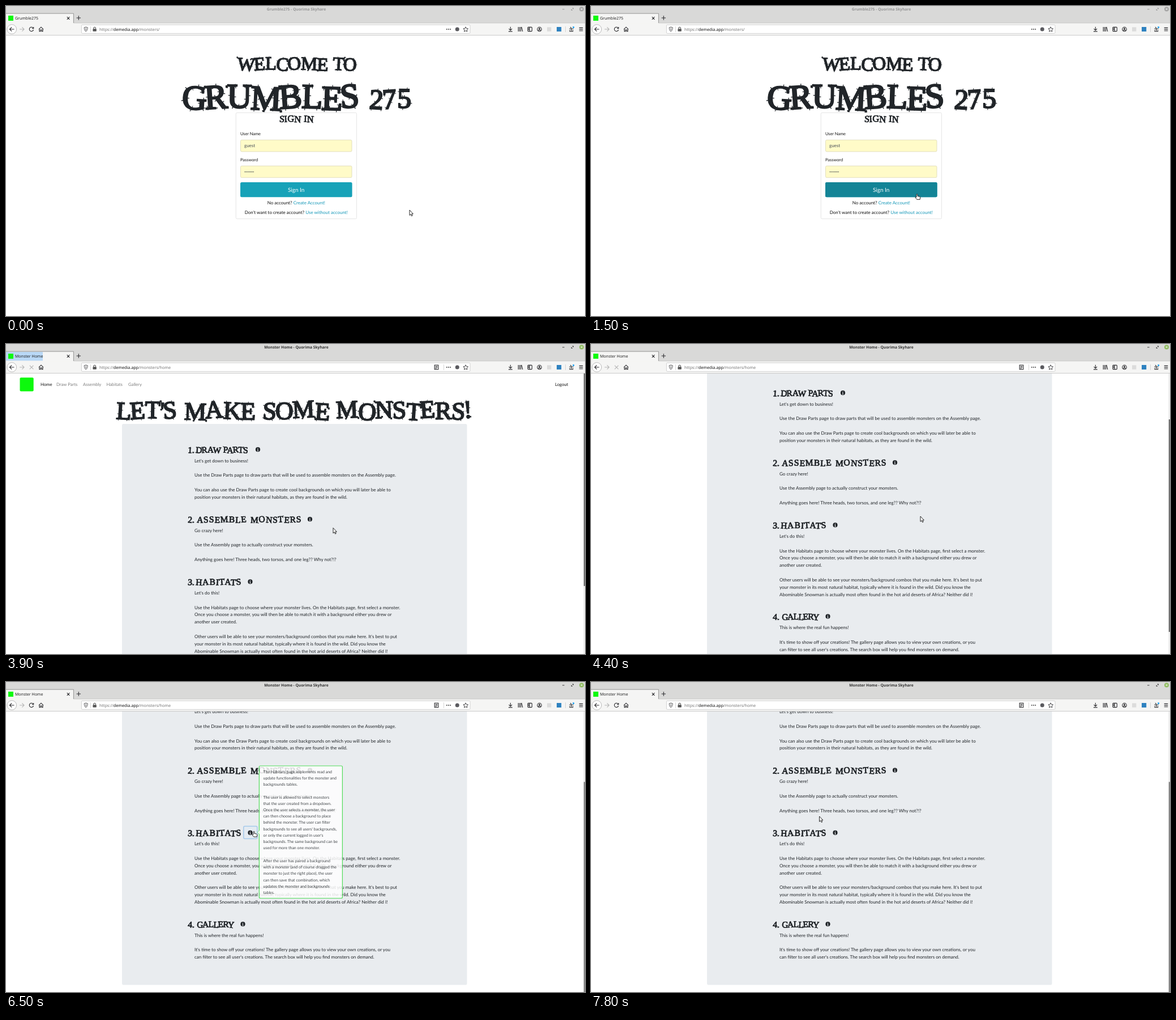
These frames come from a looping animation (1023x547 px, 8000 ms). An HTML page:

```html
<!DOCTYPE html>
<html lang="en">
<head>
<meta charset="utf-8">
<title>Monster Home</title>
<style>
  html, body { margin: 0; height: 100%; overflow: hidden; background: #fff; }
  svg { display: block; width: 100vw; height: 100vh; text-rendering: geometricPrecision; }
  text { white-space: pre; }
  .ui { font: 7px "Noto Sans", sans-serif; fill: #222; }
  .url { font-size: 7.2px; fill: #777; }
  .bold { font-weight: 700; font-size: 6.7px; }
  .page { font: 8.05px Lato, sans-serif; fill: #212529; }
  .form { font-size: 8px; fill: #111; }
  .label { font-size: 7.4px; }
  .tip { font-size: 7px; }
  .spiky { font-family: "Liberation Serif", serif; word-spacing: .07em; fill: #212529; stroke: #212529; }
  .mid { text-anchor: middle; }
  .line { fill: none; stroke: #2b2b2e; stroke-width: 1.1; }
</style>
</head>
<body>
<svg id="stage" viewBox="0 0 1023 547" preserveAspectRatio="none"></svg>
<script>
const LOOP = 8000;
const $ = id => document.getElementById(id);
const text = (s, x, y, attrs = '') => `<text x="${x}" y="${y}" ${attrs}>${s}</text>`;
const rect = (x, y, w, h, fill, attrs = '') =>
  `<rect x="${x}" y="${y}" width="${w}" height="${h}" fill="${fill}" ${attrs}/>`;
const path = (d, attrs = 'class="line"') => `<path d="${d}" ${attrs}/>`;
const circle = (x, y, r, attrs) => `<circle cx="${x}" cy="${y}" r="${r}" ${attrs}/>`;

// Wobbling serif letters; a dashed outline adds the thorns.
function spiky(s, x, y, size, spacing = 0, cls = '') {
  const lift = i => Math.sin(i * 2.3) * size * 0.03;
  const chars = [...s];
  const turns = chars.map((_, i) => (Math.sin(i * 4.1 + 1) * 4).toFixed(1)).join(' ');
  const shifts = chars.map((_, i) => (i ? lift(i) - lift(i - 1) : 0).toFixed(2)).join(' ');
  const base = `class="spiky ${cls}" font-size="${size}" letter-spacing="${spacing}" rotate="${turns}" dy="${shifts}"`;
  return text(s, x, y, `${base} stroke-width="${size * 0.045}"`) +
    text(s, x, y, `${base} aria-hidden="true" stroke-width="${size * 0.13}" ` +
      `stroke-dasharray="${size * 0.02} ${size * 0.33}"`);
}

const sections = [
  { y: 186, no: '1.', title: 'DRAW PARTS', x: 335, spacing: -0.45, icon: 445, lines: [
    "Let's get down to business!", '',
    'Use the Draw Parts page to draw parts that will be used to assemble monsters on the Assembly page.', '',
    'You can also use the Draw Parts page to create cool backgrounds on which you will later be able to',
    'position your monsters in their natural habitats, as they are found in the wild.'] },
  { y: 309, no: '2.', title: 'ASSEMBLE MONSTERS', x: 337, spacing: 1, icon: 537, lines: [
    'Go crazy here!', '',
    'Use the Assembly page to actually construct your monsters.', '',
    'Anything goes here! Three heads, two torsos, and one leg?? Why not?!?'] },
  { y: 419.2, no: '3.', title: 'HABITATS', x: 335, spacing: 1, icon: 431.5, lines: [
    "Let's do this!", '',
    'Use the Habitats page to choose where your monster lives. On the Habitats page, first select a monster.',
    'Once you choose a monster, you will then be able to match it with a background either you drew or',
    'another user created.', '',
    "Other users will be able to see your monsters/background combos that you make here. It's best to put",
    'your monster in its most natural habitat, typically where it is found in the wild. Did you know the',
    'Abominable Snowman is actually most often found in the hot arid deserts of Africa? Neither did I!'] },
  { y: 580.5, no: '4.', title: 'GALLERY', x: 337, spacing: -0.9, icon: 418.5, lines: [
    'This is where the real fun happens!', '',
    "It's time to show off your creations! The gallery page allows you to view your own creations, or you",
    "can filter to see all user's creations. The search box will help you find monsters on demand."] },
];

const tipLines = [
  'The Habitats page implements read and', 'update functionalities for the monster and', 'backgrounds tables.', '',
  'The user is allowed to select monsters', 'that the user created from a dropdown.',
  'Once the user selects a monster, the user', 'can then choose a background to place',
  'behind the monster. The user can filter', "backgrounds to see all users' backgrounds,",
  "or only the current logged in user's", 'backgrounds. The same background can be',
  'used for more than one monster.', '',
  'After the user has paired a background', 'with a monster (and of course dragged the',
  'monster to just the right place), the user', 'can then save that combination, which',
  'updates the monster and backgrounds', 'tables.'];

const paragraph = (lines, x, y, step, cls) =>
  lines.map((s, i) => s && text(s, x, y + i * step, `class="${cls}"`)).join('');

const section = s =>
  spiky(s.no, 321, s.y + 6, 15.5) + spiky(s.title, s.x, s.y + 6, 15.5, s.spacing) +
  circle(s.icon, s.y + 0.2, 4.1, 'fill="#212529"') +
  path(`M${s.icon} ${s.y - 2.4}v1.2m0 .8v3.2m-1 0h2m-2-3h1`, 'fill="none" stroke="#e9ecef" stroke-width="1"') +
  paragraph(s.lines, 333, s.y + 22.7, 12.83, 'page');

const field = y => rect(414.5, y, 196.5, 20.5, '#fffbc8', 'rx="2" stroke="#dcd9b4" stroke-width=".8"');
const linkLine = (question, link, y) =>
  text(`${question} <tspan fill="#1698b8">${link}</tspan>`, 512.8, y, 'class="page form mid"');

const login = `<g id="login">
  ${spiky('WELCOME TO', 513.5, 113, 33, -1, 'mid')}
  ${spiky('GRUMBLES', 310, 181, 61, -2.4)}${spiky('275', 641, 181, 50, 0)}
  ${rect(406.3, 188.3, 213.2, 187.2, '#fff', 'rx="2" stroke="#dfdfdf" stroke-width=".8"')}
  ${spiky('SIGN IN', 513, 204.6, 16.5, -0.1, 'mid')}
  ${text('User Name', 414, 228.3, 'class="page form label"')}${field(236.4)}
  ${text('guest', 421, 249, 'class="page form" style="fill:#495057"')}
  ${text('Password', 414, 274.3, 'class="page form label"')}${field(282.2)}
  ${path('M421.5 292.6h17', 'stroke="#495057" stroke-width="1.4" stroke-dasharray="1.4 .75"')}
  ${rect(413.1, 310, 199.4, 28, 'none', 'id="ring" rx="3" stroke="#7fccd8" stroke-width="2.2"')}
  ${rect(414, 311, 197.6, 26.2, '#17a2b8', 'rx="2.5"')}
  ${rect(414, 311, 197.6, 26.2, '#138496', 'id="hover" rx="2.5"')}
  ${text('Sign In', 512.7, 327.6, 'class="page mid" style="font-size:10px;fill:#fff"')}
  ${linkLine('No account?', 'Create Account!', 350)}
  ${linkLine("Don't want to create account?", 'Use without account!', 367.3)}
</g>`;

const navItems = [['Home', 61], ['Draw Parts', 89], ['Assembly', 136], ['Habitats', 177.5], ['Gallery', 216], ['Logout', 970]];
const home = `<g id="home"><g id="scroller">
  ${rect(24.5, 59.3, 24.2, 24.2, '#0df90d', 'rx="2"')}
  ${navItems.map(([s, x]) => text(s, x, 73.6,
    `class="page" style="font-size:7.7px;fill:${/Home|Logout/.test(s) ? '#111' : '#7f7f7f'}"`)).join('')}
  ${spiky("LET'S MAKE SOME MONSTERS!", 194, 132, 44, -1.1)}
  ${rect(205, 141, 609.5, 547, '#e9ecef', 'rx="2.5"')}
  ${rect(419.8, 408, 24, 22, '#e4ebf2', 'id="focus" rx="2" stroke="#a5c9ea" stroke-width="1.5"')}
  ${sections.map(section).join('')}
  </g>
  ${rect(1020, 52, 3, 495, '#f0f0f0')}${rect(1020.8, 52, 2.2, 375, '#777', 'id="thumb"')}
  <g id="tip">
    ${rect(447.4, 148, 147, 233.5, '#fff', 'rx="2" stroke="#35d83f" stroke-width="1.2"')}
    ${path('M447.8 261.5l-3.6 3.8 3.6 3.8', 'fill="#fff" stroke="#35d83f" stroke-width=".8"')}
    ${paragraph(tipLines, 454.5, 160.6, 11.23, 'page tip')}
  </g></g>`;

const icons =
  circle(10.3, 41, 8.3, 'fill="#fff" stroke="#aaa" stroke-width=".8"') +
  path('M14.5 41h-8m3.6-3.6L6.5 41l3.6 3.6') +
  path('M24 41h8m-3.6-3.6L32 41l-3.6 3.6', 'class="line" style="stroke:#b5b5b5"') +
  path('M48 38.8a3.7 3.7 0 1 0 .5 3.2M48.7 37v2.8h-2.9', 'class="line" id="reload"') +
  path('M41.8 37.8l6.6 6.6m0-6.6l-6.6 6.6', 'class="line" id="stop"') +
  path('M58 41.2l4-4 4 4m-7-.6v4h2v-2.6h2v2.6h2v-4') +
  rect(133.4, 33.2, 686.6, 15.2, '#fff', 'rx="1.5" stroke="#c8c8c8" stroke-width=".8"') +
  path('M138.2 38l3-1 3 1c0 3.5-1 5.7-3 7-2-1.3-3-3.5-3-7zm3 .6v4.4', 'class="line" style="stroke-width:.8"') +
  path('M149.5 36v10', 'stroke="#ccc" stroke-width=".8"') +
  rect(153.4, 40.2, 6.4, 4.6, '#555', 'rx=".8"') + path('M154.8 40.5v-1.4a1.8 1.8 0 0 1 3.6 0v1.4', 'class="line" style="stroke:#555"') +
  `<g id="reader">${rect(757.2, 37.2, 6.6, 7.6, 'none', 'class="line"')}${path('M758.7 39.5h3.6m-3.6 1.8h3.6m-3.6 1.8h2')}
    ${path('M773.5 36v10', 'stroke="#ccc" stroke-width=".8"')}</g>` +
  [778.8, 782, 785.2].map(x => circle(x, 41, 1, 'fill="#444"')).join('') +
  circle(797.3, 41, 3.5, 'fill="#5a5a5f"') +
  path('M812.2 36.8l1.3 2.8 3 .4-2.2 2.1.5 3-2.6-1.4-2.6 1.4.5-3-2.2-2.1 3-.4z', 'class="line" style="stroke-width:.9"') +
  path('M891.3 36.8v6m-2.8-2.6l2.8 2.8 2.8-2.8m-6.2 4.7h6.8') +
  path('M905.2 37v8m2.2-8v8m2.2-8v8m1.2-8l2 8') +
  rect(921.9, 37.4, 7.4, 7.2, 'none', 'class="line" rx="1"') + path('M925 37.4v7.2m-2.6-5h2m-2 2h2') +
  circle(942.5, 41, 3.7, 'class="line"') + circle(942.5, 40, 1.5, 'fill="#2b2b2e"') + path('M940 43.6q2.5-2.4 5 0') +
  rect(956, 37.4, 7.4, 7.4, '#dcdcdc') + rect(973, 37, 8.2, 8, '#2f82c0') +
  path('M988.5 36v10', 'stroke="#ccc" stroke-width=".8"') +
  path('M995.2 40.3h7.4M996 42.4v2.4h5.6v-2.4M998.9 39.6V45m0-6l-2-1.8') +
  circle(1002.6, 37.6, 1.6, 'fill="#20a0f0"') +
  path('M1012.7 38.4h6.6m-6.6 2.7h6.6m-6.6 2.7h6.6');

const chrome = `
  ${rect(0, 0, 1023, 30, '#d9d9d8')}${rect(0, 30, 1023, 21.6, '#f5f5f4')}
  ${path('M0 51.6H1023', 'stroke="#c4c4c4" stroke-width=".9"')}
  ${path('M119.5 30H1023', 'stroke="#bdbdbd" stroke-width=".7"')}
  ${rect(0, 13, 119, 17.5, '#f5f5f4')}
  ${path('M0 13.2H119.4V30', 'fill="none" stroke="#8e8e8e" stroke-width=".9"')}
  <g id="frame">
    ${text('', 513, 8.4, 'id="title" class="ui bold mid" style="fill:currentColor"')}
    ${path('M983 5.8h3.6M999 7.2l1.2-1.2m1-1l1.2-1.2m-1.8 0h1.8v1.8m-3.4 0v1.8h1.8', 'fill="none" stroke="currentColor" stroke-width=".9"')}
    ${circle(1017, 5.5, 4, 'id="close"')}${path('M1015.5 4l3 3m0-3l-3 3', 'stroke="#fff" stroke-width=".9"')}
  </g>
  ${rect(0, 14, 65, 15.5, '#b9d8f6', 'id="flash"')}
  ${rect(4, 17, 9, 9, '#0df90d', 'id="favicon"')}${circle(11.7, 21.5, 1, 'id="dot" fill="#555"')}
  ${text('', 16, 24, 'id="tab" class="ui"')}
  <linearGradient id="fade"><stop stop-color="#f5f5f4" stop-opacity="0"/><stop offset="1" stop-color="#f5f5f4"/></linearGradient>
  ${rect(88, 15, 15, 14, 'url(#fade)')}${rect(103, 15, 15, 14, '#f5f5f4')}
  ${path('M107.8 19.2l4.6 4.6m0-4.6l-4.6 4.6M124.6 21h7.4m-3.7-3.7v7.4')}
  ${icons}
  ${text('https://<tspan fill="#111">demedia.app</tspan>/monsters/<tspan id="leaf"></tspan>', 165, 43.6, 'class="ui url"')}
  <g id="status">${rect(-1, 541, 157, 8, '#f0f0f0', 'rx="1.5" stroke="#c4c4c4" stroke-width=".8"')}
    ${text('Transferring data from demedia.app…', 1.5, 549, 'class="ui"')}</g>`;

const pointers = `<g stroke="#111" stroke-width=".9" stroke-linejoin="round" fill="#fff">
  ${path('M0 0V9.4L2.2 7.4 3.6 10.6 5.2 9.9 3.8 6.8H6.4Z', 'id="arrow"')}
  ${path('M-1 .8a1 1 0 0 1 2 0V3.6L4.8 4.3Q5.8 4.6 5.8 6L5.2 9.4H-.2L-3 6Q-3.2 4.4-1 5.4Z', 'id="hand"')}</g>`;

$('stage').innerHTML = rect(0, 0, 1023, 547, '#fff') + login + home + chrome + pointers;

// Start time, x, y, and whether the pointer is a hand.
const stops = [[3900, 578, 324.5], [4400, 582, 304], [5100, 585.5, 283], [5500, 439.8, 263.6],
  [6000, 438, 263.8, true], [7400, 409.6, 209.5], [7800, 403.5, 237]];

function pointer(t) {
  if (t >= 3900) return stops.findLast(s => s[0] <= t).slice(1);
  const u = clamp((t - 800) / 700);
  const p = 1 - (1 - u) ** 2;
  return [713 - 137 * p, 360 - 28 * p, t >= 1300];
}

const show = (id, on) => { $(id).style.display = on ? '' : 'none'; };
const clamp = v => Math.min(1, Math.max(0, v));

function draw(t) {
  const loaded = t >= 3900, leaving = t >= 2400, active = t >= 2100;
  const loading = leaving && !loaded;
  show('login', !loaded);
  show('home', loaded);
  show('reader', loaded);
  $('hover').style.opacity = clamp((t - 1200) / 200);
  $('ring').style.opacity = clamp((t - 2000) / 200);

  const scroll = t < 4400 ? 0 : t < 5100 ? 100 : 153.5;
  $('scroller').setAttribute('transform', `translate(0 ${-scroll})`);
  $('thumb').setAttribute('y', 52 + scroll * 0.81);
  $('thumb').setAttribute('fill', t < 5500 ? '#707070' : '#858585');
  show('focus', t >= 6500 && t < 7800);
  show('tip', t >= 6500 && t < 7800);
  $('tip').style.opacity = t < 6900 ? 0.84 : 1;

  $('frame').style.color = active ? '#333' : '#949494';
  $('close').style.fill = active ? '#8fbb60' : '#a5a5a5';
  const name = loaded ? 'Monster Home' : loading ? '' : 'Grumble275';
  $('title').textContent = (name && name + ' - ') + 'Quorima Skyhare';
  $('tab').textContent = name || 'demedia.app/monsters/home';
  $('leaf').textContent = leaving ? 'home' : '';
  show('favicon', !loading);
  show('dot', loading);
  show('status', loading);
  show('flash', loaded && t < 4400);
  const stoppable = leaving && t < 5100;
  show('stop', stoppable);
  show('reload', !stoppable);
  $('stop').style.stroke = loaded ? '#b5b5b5' : '';

  const [x, y, hand] = pointer(t);
  show('hand', hand);
  show('arrow', !hand);
  $(hand ? 'hand' : 'arrow').setAttribute('transform', `translate(${x} ${y})`);
}

function tick() {
  draw(Math.floor(performance.now() % LOOP / 100) * 100);
  requestAnimationFrame(tick);
}
tick();
</script>
</body>
</html>
```
